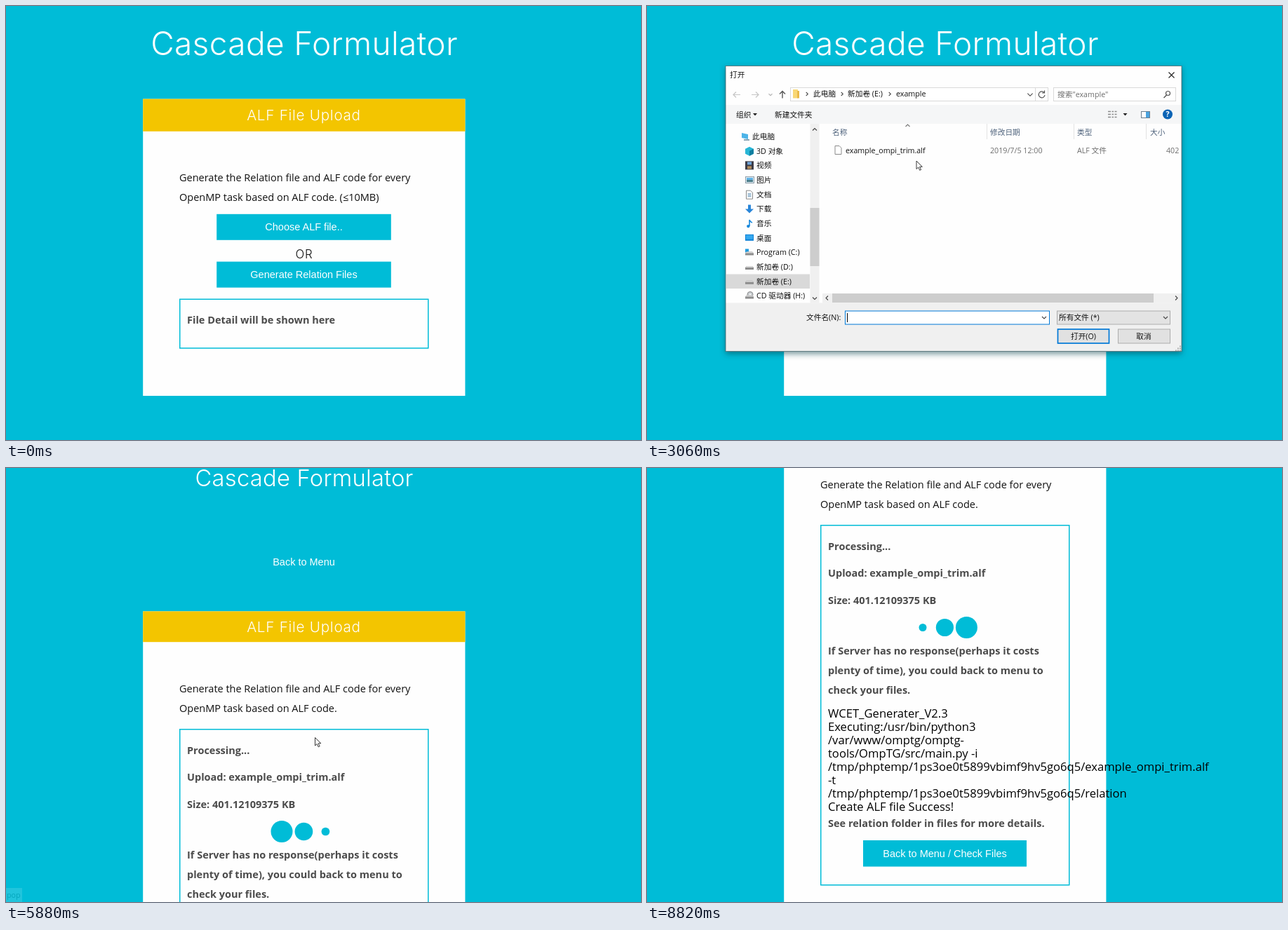
Animation, 905 px wide and 619 px high, one loop 8880 ms. Source, as an HTML page:

```html
<!DOCTYPE html>
<html lang="zh-CN">
<head>
<meta charset="utf-8">
<title>ALF File Upload</title>
<style>
html, body { margin: 0; width: 100%; height: 100%; overflow: hidden; background: #00bcd7; }
svg { display: block; width: 905px; height: 619px; }
text { white-space: pre; }
.head { font-family: Inter, sans-serif; fill: #fff; text-anchor: middle; }
.big { font-weight: 350; letter-spacing: .008em; }
.wide { font-weight: 350; letter-spacing: .7px; }
.body { font: 14.5px "Open Sans", sans-serif; fill: #111; }
.bold { font: bold 14.5px "Open Sans", sans-serif; fill: #4b4b4b; }
.log { font: 16.6px "Open Sans", sans-serif; fill: #000; }
.btn { font: 14.5px "Liberation Sans", Arial, sans-serif; fill: #fff; text-anchor: middle; }
.ui { font: 10.7px "Open Sans", "Noto Sans CJK SC", "Noto Sans CJK", sans-serif; fill: #111; }
.col { fill: #4c607a; }
.dim { fill: #6d6d6d; }
.mid { text-anchor: middle; }
</style>
</head>
<body>
<svg id="stage" viewBox="0 0 905 619" xmlns="http://www.w3.org/2000/svg"></svg>
<script>
const LOOP = 8880, STEP = 60;
const CYAN = '#00bcd7', YELLOW = '#f3c500', PAPER = '#fefefe';
const APP = 'Cascade Formulator';

const rect = (x, y, w, h, fill, more = '') =>
  `<rect x="${x}" y="${y}" width="${w}" height="${h}" fill="${fill}" ${more}/>`;
const frame = (x, y, w, h, fill, stroke, more = '') =>
  rect(x + .5, y + .5, w - 1, h - 1, fill, `stroke="${stroke}" ${more}`);
const line = (d, stroke, width = 1, more = '') =>
  `<path d="${d}" fill="none" stroke="${stroke}" stroke-width="${width}" ${more}/>`;
const text = (cls, x, y, s, more = '') => `<text class="${cls}" x="${x}" y="${y}" ${more}>${s}</text>`;
const ui = (x, mid, s, cls = '') => text('ui ' + cls, x, mid + 3.9, s);
const lines = (cls, x, y, gap, list) =>
  list.map((s, i) => text(cls, x, Math.round(y + i * gap), s)).join('');
const chevron = (x, y, dir, size = 3, stroke = '#444') =>
  line(`M${-size} ${-size / 2}L0 ${size / 2}L${size} ${-size / 2}`, stroke, 1.1,
    `transform="translate(${x} ${y}) rotate(${dir})"`);
const DOWN = 0, LEFT = 90, UP = 180, RIGHT = 270;
const button = (x, y, w, h, s) =>
  rect(x, y, w, h, CYAN) + text('btn', x + w / 2, Math.round(y + h / 2 + 4.8), s);
const outline = (y, h) =>
  rect(247.75, y, 354, h, 'none', `stroke="${CYAN}" stroke-width="1.5"`);

function uploadPage() {
  return text('head big', 425, 70, APP, 'font-size="46"') +
    rect(195.2, 132.6, 459.2, 423.4, PAPER) + rect(195.2, 132.6, 459.2, 46.2, YELLOW) +
    text('head wide', 424.5, 163, 'ALF File Upload', 'font-size="20.7"') +
    lines('body', 247, 250, 28, ['Generate the Relation file and ALF code for every',
      'OpenMP task based on ALF code. (≤10MB)']) +
    button(300.2, 296.8, 248.6, 37, 'Choose ALF file..') +
    text('head wide', 425, 360, 'OR', 'font-size="16.8" style="fill:#111"') +
    button(300.2, 364.6, 248.6, 37, 'Generate Relation Files') +
    outline(418.25, 69.75) + text('bold', 258, 453, 'File Detail will be shown here');
}

function resultPage() {
  return text('head big', 425, 26, APP, 'font-size="32.7"') +
    text('btn', 424.5, 139, 'Back to Menu') +
    rect(195.2, 204.4, 459.2, 760, PAPER) + rect(195.2, 204.4, 459.2, 43.8, YELLOW) +
    text('head wide', 424.5, 234, 'ALF File Upload', 'font-size="20.7"') +
    lines('body', 247, 320, 28, ['Generate the Relation file and ALF code for every',
      'OpenMP task based on ALF code.']) +
    outline(372.75, 513) +
    lines('bold', 258, 408, 38.3, ['Processing...', 'Upload: example_ompi_trim.alf',
      'Size: 401.12109375 KB']) +
    [393, 424.4, 455.4].map(x => `<circle class="dot" cx="${x}" cy="518.5" fill="${CYAN}"/>`).join('') +
    lines('bold', 258, 557, 28, ['If Server has no response(perhaps it costs',
      'plenty of time), you could back to menu to', 'check your files.']) +
    '<g id="log">' +
    lines('log', 258, 647, 19.05, ['WCET_Generater_V2.3', 'Executing:/usr/bin/python3',
      '/var/www/omptg/omptg-', 'tools/OmpTG/src/main.py -i',
      '/tmp/phptemp/1ps3oe0t5899vbimf9hv5go6q5/example_ompi_trim.alf', '-t',
      '/tmp/phptemp/1ps3oe0t5899vbimf9hv5go6q5/relation', 'Create ALF file Success!']) +
    text('bold', 258, 803, 'See relation folder in files for more details.') +
    button(308, 822, 233, 37.5, 'Back to Menu / Check Files') + '</g>';
}

const drive = '<path d="M0 7l2-2h8l2 2v3H0z" fill="#8d8d8d"/><path d="M0 7l2-2h8l2 2z" fill="#d5d5d5"/>';
const sheet = '<path d="M1.5 .5h6l3 3v9h-9z" fill="#fff" stroke="#8a8a8a"/>';
const screen = rect(0, 1, 12, 9, '#0a7fd6') + rect(1, 2, 10, 6, '#35a8ee');
const TREE = [
  ['此电脑', '<path d="M1 1l9 2v7l-9-2z" fill="#4db4e8"/><path d="M4 10l8 0v2H4z" fill="#8aa5b5"/>'],
  ['3D 对象', '<path d="M0 3l6-3 6 3v7l-6 3-6-3z" fill="#28b6d6"/><path d="M6 6v7l6-3V3z" fill="#0e7fa0"/>'],
  ['视频', rect(0, 0, 12, 12, '#3c3c46') + rect(3, 1, 6, 4, '#6fa4d8') + rect(3, 7, 6, 4, '#b08a5a')],
  ['图片', frame(0, 1, 13, 10, '#e8f4fb', '#8a9aa5') + rect(2, 3, 9, 3, '#5fb2e6') + rect(2, 6, 9, 3, '#4a7d8a')],
  ['文档', sheet + line('M3.5 5h5M3.5 7h5M3.5 9h5', '#5b8fb5')],
  ['下载', '<path d="M4 0h4v6h4l-6 6-6-6h4z" fill="#2a86d8"/>'],
  ['音乐', line('M6 10V1q1 3 4 4', '#1588dd', 1.6) + '<circle cx="4.3" cy="10" r="2.2" fill="#1588dd"/>'],
  ['桌面', screen],
  ['Program (C:)', rect(0, 1, 5, 5, '#1f9be0') + drive],
  ['新加卷 (D:)', drive],
  ['新加卷 (E:)', drive],
  ['CD 驱动器 (H:)', '<circle cx="7" cy="4" r="4" fill="#c9ced2" stroke="#888"/><circle cx="7" cy="4" r="1.2" fill="#fff"/>' + drive]
];

function tree() {
  return rect(113, 382.5, 119, 20.5, '#d9d9d9') +
    TREE.map(([name, icon], i) => {
      const y = 186 + i * 20.68, x = i ? 156 : 150;
      return `<g transform="translate(${x - 16} ${y - 6})">${icon}</g>` + ui(x, y, name);
    }).join('') +
    rect(232.5, 168, 13, 255.5, '#f0f0f0') + rect(232.5, 288, 13, 83, '#cdcdcd') +
    chevron(239, 176, UP) + chevron(239, 417, DOWN);
}

function dialog() {
  const grip = [[0, 6], [3, 6], [6, 6], [3, 3], [6, 3], [6, 0]]
    .map(([x, y]) => rect(753 + x, 484.5 + y, 1.8, 1.8, '#a8a8a8')).join('');
  const listIcon = [150.5, 154.5, 158.5].map(y => `M657 ${y}h4m1.5 0h2.5m1.5 0h3`).join('');
  return rect(112, 85, 650, 408, PAPER, 'filter="url(#shade)"') +
    rect(112, 141, 650, 27, '#f5f6f7') + rect(112, 423.5, 650, 69.5, '#f0f0f0') +
    ui(118, 98.5, '打开') + line('M743.5 94.5l8 8m0-8l-8 8', '#222', 1.1) +
    // address row
    line('M133 126.5h-10m4-4l-4 4 4 4M149 126.5h10m-4-4l4 4-4 4', '#c6c6c6', 1.2) +
    chevron(176, 126.5, DOWN, 2.5, '#b5b5b5') +
    line('M193 131.5v-10m-4 4l4-4 4 4', '#555', 1.4) +
    frame(204, 116, 368, 20, '#fff', '#d9d9d9') + line('M553.5 116v20', '#d9d9d9') +
    rect(208, 119, 7, 12.5, '#f8d775') + rect(214, 121, 3, 10.5, '#e9b949') +
    [228, 278, 346].map(x => chevron(x, 125.5, RIGHT, 2.6)).join('') +
    ui(237, 125.5, '此电脑') + ui(286, 125.5, '新加卷 (E:)') + ui(355, 125.5, 'example') +
    chevron(546, 126.5, DOWN, 3.6) +
    line('M566 123.5a4.4 4.4 0 1 0 1 3.5M566.5 120.5v3.5h-3.5', '#555', 1.2) +
    frame(579, 116, 175, 20, '#fff', '#d9d9d9') + ui(585, 126, '搜索"example"', 'dim') +
    '<circle cx="742.5" cy="124.5" r="3" fill="none" stroke="#555" stroke-width="1.2"/>' +
    line('M740.5 127l-4 4', '#555', 1.4) +
    // toolbar
    ui(127, 155, '组织') + ui(182, 155, '新建文件夹') +
    '<path d="M151 153h6l-3 3.5zM678.5 153h6l-3 3.5z" fill="#222"/>' +
    line(listIcon, '#8b8b8b', 1.6) +
    frame(704, 150, 13, 10, '#fff', '#6b7f90') + rect(711, 151, 5, 8, '#4aa3e0') +
    '<circle cx="742" cy="154.5" r="7" fill="#0a63b5"/>' +
    text('ui mid', 742, 158.3, '?', 'style="fill:#fff;font-weight:bold"') +
    tree() +
    // file list
    chevron(371.5, 170.5, UP, 3, '#777') +
    line('M484.5 168v22M608.5 168v22M711.5 168v22', '#e3e3e3') +
    ui(264, 180, '名称', 'col') + ui(489, 180, '修改日期', 'col') +
    ui(613, 180, '类型', 'col') + ui(717, 180, '大小', 'col') +
    rect(262, 196.5, 499.5, 18.5, 'none', 'id="row"') +
    `<g transform="translate(266.5 199)">${sheet}</g>` +
    ui(283, 206, 'example_ompi_trim.alf') + ui(489, 206, '2019/7/5 12:00', 'dim') +
    ui(613, 206, 'ALF 文件', 'dim') + ui(740, 206, '402', 'dim') +
    rect(250, 410, 512, 13.5, '#f0f0f0') + rect(264, 410, 458, 13, '#cdcdcd') +
    chevron(256.5, 416.5, LEFT) + chevron(754.5, 416.5, RIGHT) +
    // file name and buttons
    ui(227, 444.5, '文件名(N):') + frame(282, 434.5, 292, 20, '#fff', '#0078d7', 'id="field"') +
    ui(285, 444.5, '<tspan id="fname"></tspan>') + line('M285.5 438v13', '#000', 1, 'id="caret"') +
    chevron(566, 444.5, DOWN) +
    frame(584, 434.5, 162, 20, '#e3e3e3', '#adadad', 'id="kind"') +
    ui(587, 444.5, '所有文件 (*)') + chevron(739, 444.5, DOWN) +
    rect(585.5, 461, 73, 20, '#e1e1e1', 'stroke="#0078d7" id="open"') +
    ui(622, 471, '打开(O)', 'mid') +
    frame(671, 460.5, 75, 21, '#e1e1e1', '#adadad') + ui(708, 471, '取消', 'mid') +
    grip + rect(112, 85.5, 650, 407, 'none', 'stroke="#3f5f66" stroke-opacity=".8"');
}

const stage = document.getElementById('stage');
stage.innerHTML =
  `<defs><filter id="shade" x="-5%" y="-5%" width="110%" height="112%">
    <feDropShadow dx="0" dy="3" stdDeviation="4" flood-color="#003a44" flood-opacity=".55"/></filter></defs>` +
  rect(0, 0, 905, 619, CYAN) +
  `<g id="upload">${uploadPage()}</g><g id="result">${resultPage()}</g><g id="dialog">${dialog()}</g>` +
  `<g id="status" opacity=".13">${rect(0, 599, 23, 20, '#fff')}${ui(1, 609, 'pop')}</g>` +
  `<path id="arrow" d="M0 0V11.5l2.7-2.5 2 4.3 1.9-.9-2-4.1h3.7z" fill="#fff" stroke="#222" stroke-width=".9"/>` +
  `<g id="beam">${line('M-2.5-6h5M0-6V6M-2.5 6h5', '#555', 1)}</g>`;

const $ = id => document.getElementById(id);
const dots = [...document.querySelectorAll('.dot')];
const show = (id, on) => $(id).setAttribute('display', on ? 'inline' : 'none');
const set = (id, fill, stroke, width = 1) => {
  $(id).setAttribute('fill', fill);
  $(id).setAttribute('stroke', stroke);
  $(id).setAttribute('stroke-width', width);
};

// pointer path: time, x, y
const PATH = [
  [60, 880, 77], [300, 740, 230], [480, 597, 324], [660, 480, 372], [780, 384, 336], [900, 398, 317],
  [2580, 398, 317], [2700, 402, 298], [2880, 388, 250], [3060, 384, 221], [3240, 384, 207],
  [3360, 384, 207], [3600, 420, 285], [3780, 501, 355], [3960, 548, 393], [4200, 615, 474],
  [4680, 615, 474], [4860, 548, 448], [4920, 488, 431], [5040, 468, 406], [5160, 440.5, 384.5],
  [7080, 440.5, 384.5], [7320, 470, 350], [8220, 906, 36]
];

function pointer(t) {
  const i = PATH.findIndex(k => k[0] > t);
  if (i < 0) return [906, 36];
  if (i === 0) return [880, 77];
  const [a, b] = [PATH[i - 1], PATH[i]], p = (t - a[0]) / (b[0] - a[0]);
  return [a[1] + (b[1] - a[1]) * p, a[2] + (b[2] - a[2]) * p];
}

// cubic-bezier(.42, 0, .58, 1)
function easeInOut(x) {
  let lo = 0, hi = 1;
  for (let i = 0; i < 20; i++) {
    const m = (lo + hi) / 2, n = 1 - m;
    if (1.26 * n * n * m + 1.74 * n * m * m + m * m * m < x) lo = m; else hi = m;
  }
  return lo * lo * (3 - 2 * lo);
}

function dotScale(ms) {
  const p = ((ms % 1400) + 1400) % 1400 / 560;
  return p < 1 ? easeInOut(p) : p < 2 ? 1 - easeInOut(p - 1) : 0;
}

function draw(t) {
  const [x, y] = pointer(t);
  const page2 = t >= 5580, open = t >= 2520 && t < 4680;
  const picked = t >= 3360, pressed = t >= 4260;

  show('upload', !page2);
  show('result', page2);
  show('log', t >= 6480);
  show('dialog', open);
  show('status', t >= 5100 && t < 6420);

  const p = Math.min(1, Math.max(0, (t - 6540) / 420));
  $('result').setAttribute('transform', `translate(0 ${-291 * easeInOut(p)})`);
  dots.forEach((dot, i) => {
    dot.setAttribute('r', 15.5 * dotScale(560 + (t - 5880) * 1.064 - i * 160));
  });

  const overRow = y < 215;
  $('row').setAttribute('fill', pressed ? '#d9d9d9' : t >= 3240 ? '#cce8ff' : overRow ? '#e5f3ff' : 'none');
  $('field').setAttribute('stroke', picked ? '#7a7a7a' : '#0078d7');
  $('fname').textContent = picked ? 'example_ompi_trim.alf' : '';
  show('caret', !picked);
  const overKind = x > 584 && y > 434 && y < 455, overOpen = x > 585 && y > 461;
  set('kind', overKind ? '#e5f1fb' : '#e3e3e3', overKind ? '#0078d7' : '#adadad');
  if (pressed) set('open', '#cce4f7', '#1c6cb0', 1.2);
  else set('open', overOpen ? '#e5f1fb' : '#e1e1e1', '#0078d7', overOpen ? 1 : 1.7);

  const beam = t >= 6960 && t < 7200;
  show('arrow', t >= 60 && t < 8220 && !beam);
  show('beam', beam);
  $('arrow').setAttribute('transform', `translate(${x} ${y})`);
  $('beam').setAttribute('transform', `translate(${x + .5} ${y + 1})`);
}

const start = performance.now();
function tick() {
  const t = (performance.now() - start) % LOOP;
  draw(Math.floor(t / STEP) * STEP);
  requestAnimationFrame(tick);
}
tick();
</script>
</body>
</html>
```
